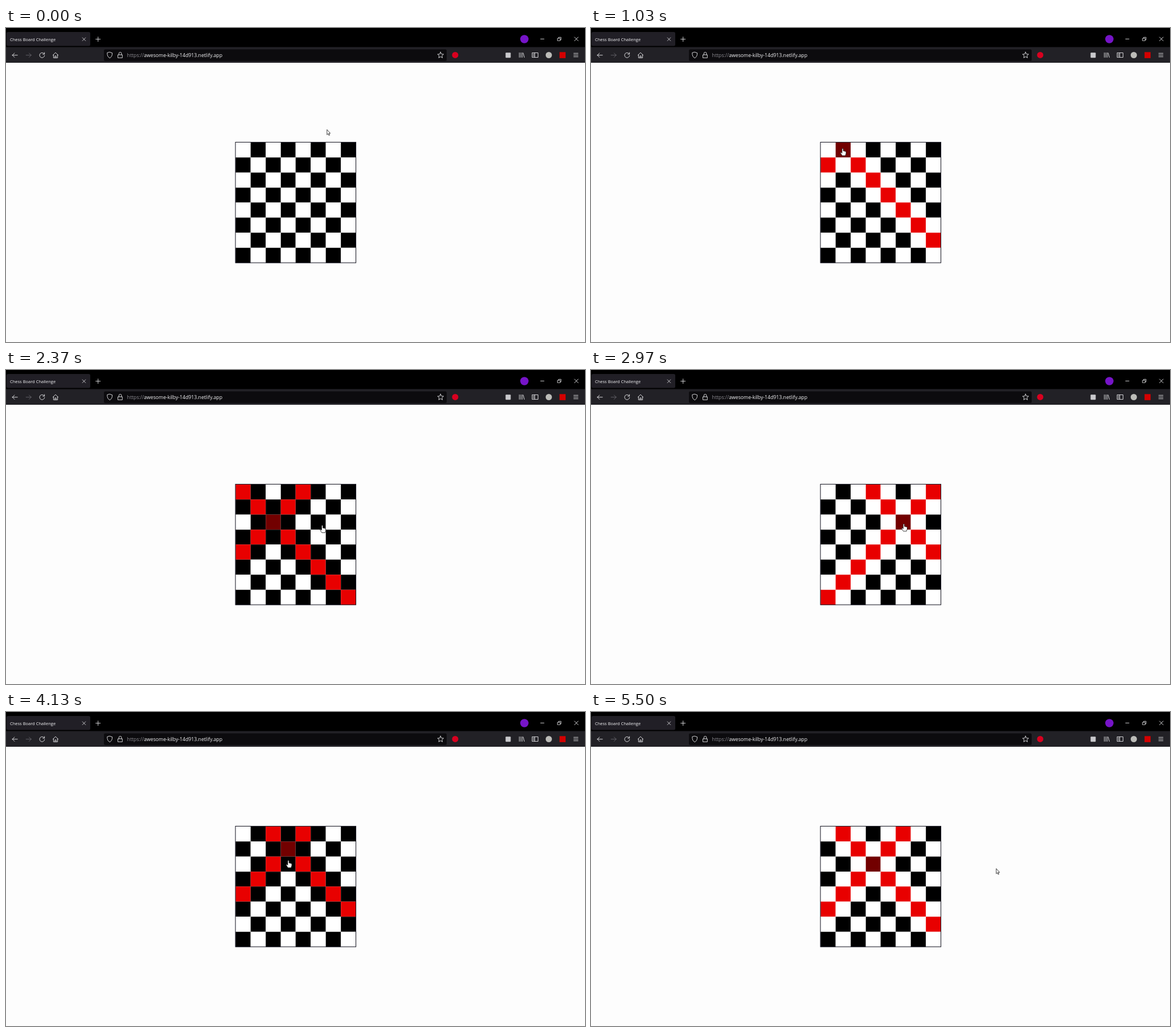
Write an HTML page with a canvas that moves like this. It is 1017 px wide and 551 px high and loops after 5530 ms.

```html
<!DOCTYPE html>
<html lang="en">
<head>
<meta charset="utf-8">
<title>Chess Board Challenge</title>
<style>
  html, body { margin: 0; width: 100%; height: 100%; overflow: hidden; background: #fdfdfd; }
  canvas { display: block; width: 1017px; height: 551px; }
</style>
</head>
<body>
<canvas id="stage"></canvas>
<script>
const W = 1017, H = 551, LOOP = 5530;
const canvas = document.getElementById('stage');
const ctx = canvas.getContext('2d');
const dpr = window.devicePixelRatio || 1;
canvas.width = W * dpr;
canvas.height = H * dpr;
ctx.scale(dpr, dpr);

const INK = '#e8e8ea';
const BOARD = { x: 403.2, y: 200.7, cell: 26.43 };

// time, column, row
const clicks = [[800, 1, 0], [1750, 2, 2], [2480, 5, 2], [3500, 3, 1], [4300, 3, 2]];

// time, x, y of the pointer tip
const path = [
  [0, 563.5, 178], [40, 563.5, 178], [430, 442, 211], [1150, 442, 211],
  [1500, 472, 266.5], [1980, 472, 266.5], [2370, 555.5, 272.5], [2870, 555.5, 272.5],
  [3380, 496, 247], [3950, 496, 247], [4180, 496, 262], [4590, 496, 262],
  [5060, 711.5, 274.5], [LOOP, 711.5, 274.5]
];

function rect(x, y, w, h, color, r = 0) {
  ctx.fillStyle = color;
  ctx.beginPath();
  ctx.roundRect(x, y, w, h, r);
  ctx.fill();
}

function disc(x, y, r, color) {
  ctx.fillStyle = color;
  ctx.beginPath();
  ctx.arc(x, y, r, 0, Math.PI * 2);
  ctx.fill();
}

function stroke(d, x, y, color = INK, width = 0.9) {
  ctx.save();
  ctx.translate(x, y);
  ctx.strokeStyle = color;
  ctx.lineWidth = width;
  ctx.lineCap = ctx.lineJoin = 'round';
  ctx.stroke(new Path2D(d));
  ctx.restore();
}

function text(str, x, y, size, color) {
  ctx.font = `${size}px "Open Sans", "Noto Sans", sans-serif`;
  ctx.fillStyle = color;
  ctx.fillText(str, x, y);
  return ctx.measureText(str).width;
}

function starPath(r) {
  let d = '';
  for (let i = 0; i < 10; i++) {
    const a = -Math.PI / 2 + i * Math.PI / 5, q = i % 2 ? r * 0.46 : r;
    d += (i ? 'L' : 'M') + q * Math.cos(a) + ' ' + q * Math.sin(a);
  }
  return d + 'Z';
}

const ARROW = 'M-4.5 0H4.5M-4.5 0L-.8 -3.7M-4.5 0L-.8 3.7';
const BACK_TO_FRONT = 'M4.5 0H-4.5M4.5 0L.8 -3.7M4.5 0L.8 3.7';
const CROSS = 'M-2.8 -2.8L2.8 2.8M2.8 -2.8L-2.8 2.8';
const STAR = starPath(5.6);

function drawTabs() {
  rect(0, 0, W, 34, '#000');
  rect(1, 7, 147, 24.5, '#211f26', 2.5);
  text('Chess Board Challenge', 7, 22.7, 7.5, '#f4f4f6');
  stroke(CROSS, 137, 19.7, INK, 0.8);
  stroke('M-4 0H4M0 -4V4', 161.7, 19.7);
  disc(910.5, 19.5, 7.3, '#7614c8');
  stroke('M-3 0H3', 942, 19.3);
  stroke('M-3 -1.2H1.4V3H-3ZM-1.4 -1.4V-3H3V1.4H1.6', 972, 19.3, INK, 0.8);
  stroke('M-3.3 -3.3L3.3 3.3M3.3 -3.3L-3.3 3.3', 1001.8, 19.3);
}

function drawToolbar() {
  rect(0, 33.5, W, 27.5, '#222126');
  rect(172, 37.5, 602, 20.5, '#0c0b0e', 2.5);
  stroke(ARROW, 15.7, 47.7);
  stroke(BACK_TO_FRONT, 39.7, 47.7, '#67666c');
  stroke('M3.6 -2.6A4.4 4.4 0 1 0 4.4 .4M4.2 -4.8V-1.8H1.2', 63.4, 47.8);
  stroke('M-4.6 0L0 -4.6L4.6 0M-3.6 -.8V4.6H3.6V-.8M-1.1 4.4V1.3H1.1V4.4', 87, 47.7);
  stroke('M0 -5L4.4 -3.6C4.5 1 3.2 3.6 0 5.3C-3.2 3.6 -4.5 1 -4.4 -3.6Z', 182.2, 47.4);
  stroke('M-3.7 -.7H3.7V4.6H-3.7ZM-2.3 -.9V-2.9A2.3 2.3 0 0 1 2.3 -2.9V-.9', 200.6, 47.7);
  const scheme = text('https://', 212.6, 51.4, 8.7, '#8c8b91');
  text('awesome-kilby-14d913.netlify.app', 212.6 + scheme, 51.4, 8.7, '#f4f4f6');
  stroke(STAR, 763.3, 47.8);

  disc(789, 47.4, 5.5, '#d8001f');
  rect(877.5, 43.2, 9, 9, '#c9c9cc', 1);
  stroke('M-4 -4V4M-1.4 -4V4M1.2 -4V4M2.7 -3.6L4.8 4', 905.7, 47.5);
  stroke('M-5 -4H5V4H-5ZM-.8 -4V4M-3.6 -2H-2.2M-3.6 0H-2.2M-3.6 2H-2.2', 929.5, 47.5);
  disc(953.4, 47.5, 5.5, '#bcbcb8');
  rect(972.3, 42.3, 10.6, 10.6, '#d40000');
  stroke('M-3.8 -3H3.8M-3.8 0H3.8M-3.8 3H3.8', 1001, 47.4);
}

function cellColor(c, r, pick) {
  if (pick) {
    const dx = Math.abs(c - pick[1]), dy = Math.abs(r - pick[2]);
    if (dx + dy === 0) return '#720000';
    if (dx === dy) return '#e80000';
  }
  return (c + r) % 2 ? '#000' : '#fff';
}

function drawBoard(t) {
  const pick = clicks.filter(k => k[0] <= t).pop();
  const { x, y, cell } = BOARD, edge = i => Math.round(i * cell * 2) / 2;
  for (let r = 0; r < 8; r++) {
    for (let c = 0; c < 8; c++) {
      rect(x + edge(c), y + edge(r), edge(c + 1) - edge(c), edge(r + 1) - edge(r), cellColor(c, r, pick));
    }
  }
  ctx.strokeStyle = '#0b0b18';
  ctx.lineWidth = 1;
  ctx.strokeRect(403, 200.4, 211.6, 211.6);
}

function pointerAt(t) {
  const i = Math.max(1, path.findIndex(p => p[0] > t));
  const [t0, x0, y0] = path[i - 1], [t1, x1, y1] = path[i];
  const u = (t - t0) / (t1 - t0), k = u * u * (3 - 2 * u);
  return [x0 + (x1 - x0) * k, y0 + (y1 - y0) * k];
}

const arrowShape = new Path2D('M.3 .3V9.3L2.3 7.4L3.6 10.5L5 9.9L3.7 6.9H6.2Z');
const handShape = new Path2D('M-1.1 1Q0 -.8 1.1 1V4.6L5 5.4Q6 5.7 6 6.8V9.2L4.8 13H-.8L-3.7 8.6Q-3.8 7 -2.5 7.3L-1.1 8.6Z');

function drawPointer(t) {
  const [px, py] = pointerAt(t), span = BOARD.cell * 8;
  const over = px > BOARD.x && px < BOARD.x + span && py > BOARD.y && py < BOARD.y + span;
  const shape = over ? handShape : arrowShape;
  ctx.save();
  ctx.translate(px, py);
  ctx.fillStyle = '#fff';
  ctx.strokeStyle = '#111';
  ctx.lineWidth = 0.8;
  ctx.lineJoin = 'round';
  ctx.fill(shape);
  ctx.stroke(shape);
  ctx.restore();
}

const start = performance.now();
function frame() {
  const t = (performance.now() - start) % LOOP;
  rect(0, 0, W, H, '#fdfdfd');
  drawTabs();
  drawToolbar();
  drawBoard(t);
  drawPointer(t);
  requestAnimationFrame(frame);
}
frame();
</script>
</body>
</html>
```
